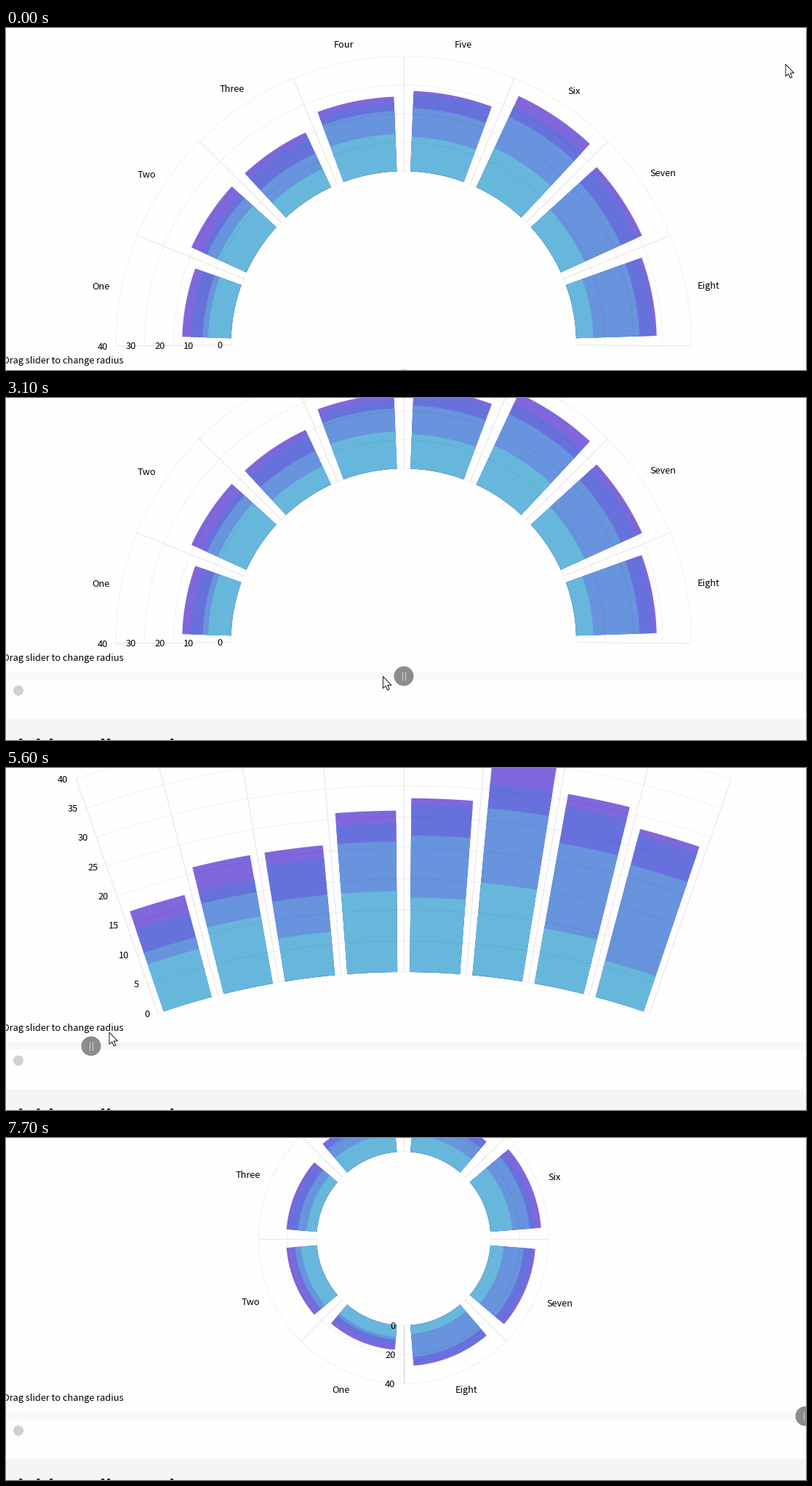
A matplotlib script that plays this animation: 1100x471 px, repeating every 8000 ms.

```python
import colorsys

import matplotlib.pyplot as plt
import numpy as np
from matplotlib.animation import FuncAnimation
from matplotlib.collections import LineCollection, PolyCollection
from matplotlib.patches import Circle, Polygon, Rectangle

W, H = 1100, 471
STEP, FRAMES = 100, 80
DPI = 100
PX = 72 / DPI
FONT = "Noto Sans CJK JP"

# Chart layout
CX, TOP, BOX_W, BOX_H = 546.75, 39, 1051, 399
MAX_VALUE, HOLE = 40, 0.6
COLORS = [colorsys.hls_to_rgb((199 + 18 * k) / 360, 0.633, 0.626)
          for k in range(4)]
DATA = {
    "One": (8, 2, 4, 3), "Two": (11, 4, 2, 4),
    "Three": (7, 6, 6, 2), "Four": (13, 8, 3, 2),
    "Five": (12, 10, 5, 1), "Six": (15, 12, 4, 4),
    "Seven": (9, 14, 6, 2), "Eight": (6, 16, 5, 1),
}
N = len(DATA)

# Slider: the thumb trails the pointer and the chart trails the thumb
TRACK_X, TRACK_LEN, TRACK_Y = -5, 1104, 483
THUMB_MIN, THUMB_MAX = 18, 1099
THUMB_LAG, CHART_LAG = 100, 140
DRAG_START = 3000

# Pointer key points: time, x, y
ROAM = [(0, 1072, 50), (400, 848, 112), (800, 690, 205), (1400, 690, 205),
        (1800, 888, 173), (2100, 888, 173), (2900, 547, 383)]
DRAG = [(DRAG_START, 547, 383), (3660, 358, 386), (4700, 45, 346),
        (4900, 18, 350), (5300, 18, 356), (5460, 107, 361), (5600, 142, 364),
        (6350, 823, 383), (6500, 873, 383), (6900, 873, 383),
        (7500, 1125, 383)]
TIMES, XS, YS = np.transpose(ROAM + DRAG)

ARROW = np.array([(0, 0), (0, 16.5), (3.8, 13), (6.3, 18.8), (8.8, 17.7),
                  (6.4, 12), (11.5, 12)])
HALF = np.array([(-11, 0), (-6, -5), (-6, -1.7), (6, -1.7), (6, -5)])
RESIZE = np.vstack([HALF, -HALF])

fig = plt.figure(figsize=(W / DPI, H / DPI), dpi=DPI, facecolor="#fefefe")
ax = fig.add_axes([0, 0, 1, 1])
ax.set_xlim(0, W)
ax.set_ylim(H, 0)
ax.axis("off")


def add_text(s, size=12.8, **kw):
    kw = {"family": FONT, "color": "black", "zorder": 6, **kw}
    return ax.text(0, 0, s, fontsize=size * PX, va="baseline", **kw)


def add_lines(color, zorder):
    return ax.add_collection(LineCollection(
        [], colors=[color], linewidths=PX, zorder=zorder))


def add_patch(patch):
    return ax.add_patch(patch)


bars = ax.add_collection(PolyCollection([], edgecolors="none", zorder=2))
rings = add_lines((0, 0, 0, 0.06), 3)
spokes = add_lines((0, 0, 0, 0.1), 3)
names = [add_text(n, ha="center") for n in DATA]
half_widths = [n.get_window_extent().width / 2 for n in names]
ticks = [add_text("", ha="right") for _ in range(9)]

caption = add_text("Drag slider to change radius", ha="right")
heading = add_text("Variable-radius radar", 29, family="Liberation Sans",
                   weight="bold", color="#333333", ha="left")
footer = add_patch(Rectangle((0, 0), W, 200, fc="#f5f5f5", ec="none"))
track = add_patch(Rectangle((0, 0), W, 10, fc="#f8f8f9", ec="none"))
badge = add_patch(Circle((0, 0), 7, fc="#d0d0d0", ec="none"))
thumb = add_patch(Circle((0, 0), 13.5, ec="none", zorder=7))
grip = add_lines("#d6d6d6", 8)
pointer = add_patch(Polygon(ARROW, closed=True, fc="white", ec="black",
                            lw=0.9 * PX, zorder=9))


def pointer_at(t):
    return np.array([np.interp(t, TIMES, XS), np.interp(t, TIMES, YS)])


def slider_x(t):
    return np.clip(pointer_at(max(t, DRAG_START))[0], THUMB_MIN, THUMB_MAX)


def smooth(p):
    p = min(max(p, 0), 1)
    return p * p * (3 - 2 * p)


def radii(half):
    """Outer and inner radius that fit a fan of the given half angle."""
    c = np.cos(half)
    wide = 2 * np.sin(min(half, np.pi / 2))
    free = min(BOX_W / wide, BOX_H / (1 - c))
    hole = max(HOLE, 1 - BOX_H / free)
    outer = BOX_H / (1 - hole * c if c > 0 else 1 - c)
    return outer, outer * hole


def draw_chart(pos, scroll):
    half = np.radians(1 + 179 * pos)
    outer, inner = radii(half)
    cy = TOP - scroll + outer
    unit = (outer - inner) / MAX_VALUE
    cell = 2 * half / N

    def polar(r, a):
        return np.column_stack([CX + r * np.sin(a), cy - r * np.cos(a)])

    shapes, fills = [], []
    for i, values in enumerate(DATA.values()):
        a = -half + cell * (i + np.linspace(0.1, 0.9, 24))
        base = polar(inner, a)[::-1]
        # Tallest first, so that each lower layer covers its foot
        for total, color in list(zip(np.cumsum(values), COLORS))[::-1]:
            shapes.append(np.vstack([polar(inner + unit * total, a), base]))
            fills.append(color)
    bars.set_verts(shapes)
    bars.set_facecolor(fills)

    length = outer - inner
    step = 5 if length >= 200 else 10 if length >= 120 else 20
    levels = np.arange(0, MAX_VALUE + 1, step)
    sweep = np.linspace(-half, half, 240)
    rings.set_segments([polar(inner + unit * v, sweep) for v in levels])
    edges = -half + cell * np.arange(N + 1)
    spokes.set_segments([polar(np.array([inner, outer]), a) for a in edges])

    for k, label in enumerate(ticks):
        label.set_visible(k < len(levels))
        if k < len(levels):
            x, y = polar(inner + unit * levels[k], -half)[0]
            label.set_text(str(levels[k]))
            label.set_position((x - 11.5, y + 4.6))

    for i, (label, hw) in enumerate(zip(names, half_widths)):
        a = -half + cell * (i + 0.5)
        gap = np.hypot((hw + 16) * np.sin(a), 24.5 * np.cos(a))
        x, y = polar(outer + gap, a)[0]
        label.set_position((x, y + 4.8))
        label.set_visible(-20 < y < H + 20)


def draw_page(scroll):
    caption.set_position((162, 462 - scroll))
    heading.set_position((-29, 591 - scroll))
    footer.set_y(542 - scroll)
    track.set_y(478 - scroll)
    badge.center = (17, 503 - scroll)


def draw(frame):
    t = frame * STEP
    scroll = 100 * smooth((t - 2000) / 600)
    draw_page(scroll)
    draw_chart((slider_x(t - CHART_LAG) - TRACK_X) / TRACK_LEN, scroll)

    x, y = slider_x(t - THUMB_LAG), TRACK_Y - scroll
    thumb.center = (x, y)
    thumb.set_facecolor("#8c8c8c" if t >= 2900 else "#d9d9d9")
    grip.set_segments([[(x + d, y - 6), (x + d, y + 6)] for d in (-2, 2)])

    shape = RESIZE if t >= 6400 else ARROW
    pointer.set_xy(shape + pointer_at(t))
    return []


anim = FuncAnimation(fig, draw, frames=FRAMES, interval=STEP,
                     init_func=lambda: draw(0), repeat=True, repeat_delay=0)
plt.show()
```
